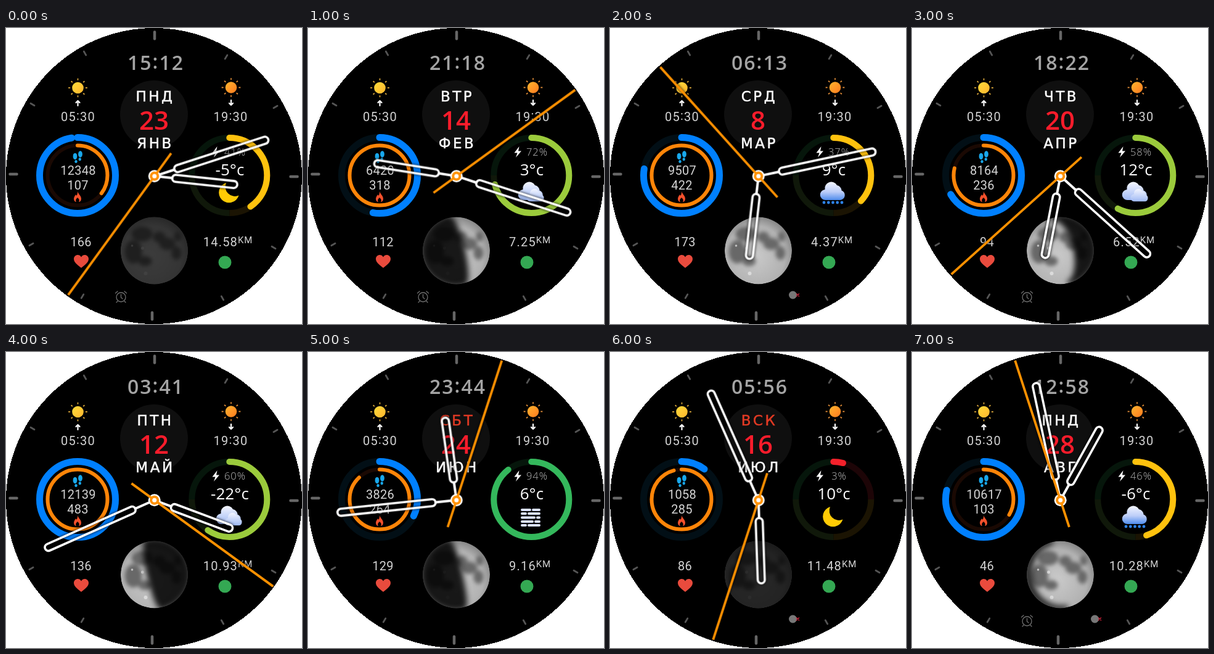
Recreate the animation shown at these times as an HTML page. Size 480 px wide and 480 px high, loop 8000 ms.

```html
<!DOCTYPE html>
<html lang="ru">
<head>
<meta charset="utf-8">
<title>Watch face</title>
<style>
  html, body { margin: 0; width: 100%; height: 100%; overflow: hidden; background: #fff; }
  svg { display: block; width: 480px; height: 480px; }
  text { text-anchor: middle; white-space: pre; }
  .face { visibility: hidden; animation: show 8s step-end infinite; }
  @keyframes show { 0% { visibility: visible; } 12.5%, 100% { visibility: hidden; } }
  .time { font: 600 32px "Open Sans", sans-serif; letter-spacing: 2px; fill: #a4a4a4; }
  .num { font: 400 20px Roboto, sans-serif; letter-spacing: .3px; fill: #d4d4d4; }
  .wide { letter-spacing: 1.2px; }
  .word { font: 23px "DejaVu Sans", sans-serif; letter-spacing: 3.5px; fill: #fff; stroke: #fff; stroke-width: .5px; }
  .off { fill: #e23a24; stroke: #e23a24; }
  .date { font: 600 42px "Open Sans", sans-serif; fill: #f91c2b; }
  .bat { font: 300 16.5px "Open Sans", sans-serif; letter-spacing: 1px; fill: #bdbdbd; }
  .temp { font: 400 26px "Open Sans", sans-serif; letter-spacing: .1px; fill: #fff; }
  .unit { font-size: 15px; letter-spacing: .8px; }
  .line { fill: none; stroke-linecap: round; stroke-linejoin: round; }
  .hands { filter: drop-shadow(0 0 2px #000); }
</style>
</head>
<body>
<svg id="watch" viewBox="0 0 480 480">
  <defs>
    <radialGradient id="moonFill" cx=".45" cy=".58" r=".6">
      <stop offset="0" stop-color="#cacaca"/><stop offset=".75" stop-color="#b2b2b2"/><stop offset="1" stop-color="#848484"/>
    </radialGradient>
    <linearGradient id="cloudFill" x1="0" y1="0" x2="0" y2="1">
      <stop offset="0" stop-color="#f2f5ff"/><stop offset=".55" stop-color="#bccdf8"/><stop offset="1" stop-color="#4f8cec"/>
    </linearGradient>
    <linearGradient id="paleFill" x1="0" y1="0" x2="0" y2="1">
      <stop offset="0" stop-color="#f4f6ff"/><stop offset="1" stop-color="#9fb9f4"/>
    </linearGradient>
    <linearGradient id="sunFill" x1="0" y1="0" x2="1" y2="1">
      <stop offset="0" stop-color="#ffdc3a"/><stop offset="1" stop-color="#ffb52e"/>
    </linearGradient>
    <linearGradient id="duskFill" x1="0" y1="0" x2="1" y2="1">
      <stop offset="0" stop-color="#ffb52e"/><stop offset="1" stop-color="#ff7a1f"/>
    </linearGradient>
    <filter id="soft" x="-30%" y="-30%" width="160%" height="160%"><feGaussianBlur stdDeviation="3"/></filter>
    <filter id="dusk" x="-50%" y="-50%" width="200%" height="200%"><feGaussianBlur stdDeviation="5"/></filter>
    <clipPath id="disc"><circle r="54.5"/></clipPath>
    <g id="moon" clip-path="url(#disc)">
      <circle r="54.5" fill="url(#moonFill)"/>
      <g filter="url(#soft)" fill="#686868">
        <ellipse cx="-20" cy="-27" rx="17" ry="12"/><ellipse cx="-34" cy="2" rx="14" ry="19"/>
        <ellipse cx="8" cy="-22" rx="10" ry="9"/><ellipse cx="21" cy="-11" rx="13" ry="10"/>
        <ellipse cx="38" cy="-23" rx="6" ry="8"/><ellipse cx="36" cy="4" rx="8" ry="11"/>
        <ellipse cx="-15" cy="17" rx="11" ry="8"/>
      </g>
      <g fill="#e8e8e8" opacity=".7"><circle cx="-14" cy="37" r="3"/><circle cx="-19" cy="-4" r="2.5"/><circle cx="-36" cy="-8" r="1.8"/></g>
    </g>
    <path id="cloud" d="M350 279a8.500 8.500 0 0 1-1.500-17 10.500 10.500 0 0 1 19.500-7 9 9 0 0 1 7.500 8.500 8 8 0 0 1-2 15.500Z"/>
  </defs>
</svg>
<script>
const svg = document.getElementById('watch');

const text = (cls, x, y, s) => `<text class="${cls}" x="${x}" y="${y}">${s}</text>`;
const clock = (cls, x, y, s) => text(cls, x, y, s.replace(/:(.*)/, '<tspan dy="-2">:</tspan><tspan dy="2">$1</tspan>'));
const stroke = (d, color, w) => `<path class="line" d="${d}" stroke="${color}" stroke-width="${w}"/>`;
const ring = (x, r, w, color, from, sweep, cap = 'round') =>
  `<circle cx="${x}" cy="239" r="${r}" fill="none" stroke="${color}" stroke-width="${w}" pathLength="360"
    stroke-dasharray="${sweep} 360" stroke-linecap="${cap}" transform="rotate(${from - 90} ${x} 239)"/>`;

function sun(x, y, color, fill) {
  return `<g transform="translate(${x} ${y})"><circle r="9.300" fill="url(#${fill})"/>
    <circle r="13.800" fill="none" stroke="${color}" stroke-width="3" pathLength="80" stroke-dasharray="1.600 8.400" stroke-dashoffset=".8"/></g>`;
}

function ticks() {
  const big = [[241, 12], [467, 241], [237, 467], [12, 237]];
  const small = [[128, 41], [357, 47], [437, 128], [434, 356], [351, 438], [124, 435], [41, 351], [43, 124]];
  const draw = (len, w, color) => ([x, y], i) => {
    const a = len > 5 ? i * 90 : Math.atan2(y - 240, x - 240) * 180 / Math.PI + 90;
    return `<path class="line" d="M0 ${-len}V${len}" stroke="${color}" stroke-width="${w}" transform="translate(${x} ${y}) rotate(${a})"/>`;
  };
  return big.map(draw(5.5, 4.5, '#666')).join('') + small.map(draw(3.5, 2.8, '#555')).join('');
}

const feet = `<g fill="#18a8ec">
  <ellipse cx="120.500" cy="204.500" rx="3.400" ry="5.300"/><ellipse cx="119.800" cy="212.800" rx="2.200" ry="2.600"/>
  <ellipse cx="112" cy="208" rx="3.400" ry="5.300"/><ellipse cx="113.500" cy="216.500" rx="2.200" ry="2.600"/></g>`;
const flame = `<path fill="#f4512c" d="M116 265c1 4 6 7 6 12 0 3-2 5-4 5 2-3 0-5-2-7-2 2-4 4-2 7-2 0-4-2-4-5 0-3 2-5 3-7l1 2c2-2 2-4 2-7Z"/>`;
const heart = `<path fill="#e94b3d" d="M122 389C116 384 110 380 110 374.500c0-7 9-9 12-3 3-6 12-4 12 3 0 5.500-6 9.500-12 14.500Z"/>`;
const bolt = `<path fill="#fff" d="M342.500 192 334.500 202.500H339.500L337 210 346 199.500H341Z"/>`;
const alarm = `<circle cx="186.500" cy="436.500" r="7.500" fill="none" stroke="#707070" stroke-width="1.300"/>` +
  stroke('M186.500 432V437L189 439M177.500 430 181 427M195.500 430 192 427M181 443 179 445M192 443 194 445', '#707070', 1.3);
const link = `<circle cx="296.500" cy="433" r="6.500" fill="#777"/>` + stroke('M302.500 431 306.500 435M306.500 431 302.500 435', '#d6203a', 1.3);

const weather = {
  night: `<path fill="#ffcb05" d="M357 251a16.500 16.500 0 1 0 20.500 20.500A15.500 15.500 0 0 1 357 251Z"/>`,
  cloud: `<use href="#cloud" fill="url(#paleFill)"/>
    <use href="#cloud" fill="url(#paleFill)" transform="translate(116 86) scale(.7)"/>`,
  rain: `<use href="#cloud" fill="url(#cloudFill)"/>` +
    [347, 354.3, 361.5, 368.7, 376].map(x => `<circle cx="${x}" cy="283" r="2.400" fill="#2d82ea"/>`).join(''),
  fog: stroke('M347 256H360M365 256H375M347 262H353M358 262H375M347 268.500H367M372 268.500H375M347 275H364M369 275H375M347 281H353M358 281H375', '#dbe2ff', 4)
};

// edge: where the shadow ends, measured from the disc's middle
function moon([side, edge, dark]) {
  const shade = `M0-54.500A54.500 54.500 0 0 ${side > 0 ? 1 : 0} 0 54.500A${Math.abs(edge)} 54.500 0 0 ${edge < 0 ? 1 : 0} 0-54.500Z`;
  const full = Math.abs(edge) > 54;
  return `<g transform="translate(240.500 361)"><use href="#moon"/><g clip-path="url(#disc)">` +
    (full ? `<circle r="55" opacity="${dark}"/>`
      : `<path d="${shade}" stroke="#000" stroke-width="8" transform="rotate(-13)" filter="url(#dusk)" opacity="${dark}"/>`) +
    `</g></g>`;
}

function hand(angle, start, end) {
  return `<g transform="rotate(${angle})">${stroke(`M0-8V${-start}`, '#fff', 4)}
    <rect x="-5.700" y="${2 - end}" width="11.400" height="${end - start - 2}" rx="5.700" fill="none" stroke="#fff" stroke-width="3.600"/></g>`;
}

function hands(time, sec) {
  const [h, m] = time.split(':').map(Number);
  return `<g class="hands" transform="translate(240.700 240.200)">${hand(h * 30 + m / 2, 29, 137)}${hand(m * 6, 34, 196)}
    <circle r="10" fill="#fff"/>
    <path d="M0 46V-238" stroke="#ff9100" stroke-width="3.800" transform="rotate(${sec * 6})"/>
    <circle r="7.500" fill="#ff9100"/><circle r="3.500" fill="#fff"/></g>`;
}

const YELLOW = '#ffc20e', LIME = '#9bcb3c', GREEN = '#34b85c', RED = '#f4212b';
const faces = [
  { time: '15:12', sec: 36, day: 'ПНД', date: 23, month: 'ЯНВ', steps: 12348, blue: 351, kcal: 107, burn: 127,
    bat: 41, arc: 146, color: YELLOW, temp: '-5', sky: 'night', pulse: 166, km: '14.58', moon: [-1, 55, .7], alarm: 1 },
  { time: '21:18', sec: 9, day: 'ВТР', date: 14, month: 'ФЕВ', steps: 6420, blue: 190, kcal: 318, burn: 360,
    bat: 72, arc: 256, color: LIME, temp: '3', sky: 'cloud', pulse: 112, km: '7.25', moon: [-1, 10, .88], alarm: 1 },
  { time: '06:13', sec: 53, day: 'СРД', date: 8, month: 'МАР', steps: 9507, blue: 280, kcal: 422, burn: 360,
    bat: 37, arc: 133, color: YELLOW, temp: '9', sky: 'rain', pulse: 173, km: '4.37', moon: [-1, 55, 0], link: 1 },
  { time: '18:22', sec: 38, day: 'ЧТВ', date: 20, month: 'АПР', steps: 8164, blue: 240, kcal: 236, burn: 284,
    bat: 58, arc: 208, color: LIME, temp: '12', sky: 'cloud', pulse: 94, km: '6.52', moon: [1, 25, .88], alarm: 1 },
  { time: '03:41', sec: 21, day: 'ПТН', date: 12, month: 'МАЙ', steps: 12139, blue: 360, kcal: 483, burn: 360,
    bat: 60, arc: 215, color: LIME, temp: '-22', sky: 'cloud', pulse: 136, km: '10.93', moon: [1, -8, .88] },
  { time: '23:44', sec: 3, day: 'СБТ', date: 24, month: 'ИЮН', steps: 3826, blue: 116, kcal: 264, burn: 317,
    bat: 94, arc: 322, color: GREEN, temp: '6', sky: 'fog', pulse: 129, km: '9.16', moon: [-1, 6, .88] },
  { time: '05:56', sec: 33, day: 'ВСК', date: 16, month: 'ИЮЛ', steps: 1058, blue: 37, kcal: 285, burn: 345,
    bat: 3, arc: 15, color: RED, temp: '10', sky: 'night', pulse: 86, km: '11.48', moon: [-1, 55, .8], link: 1 },
  { time: '12:58', sec: 57, day: 'ПНД', date: 28, month: 'АВГ', steps: 10617, blue: 284, kcal: 103, burn: 121,
    bat: 46, arc: 163, color: YELLOW, temp: '-6', sky: 'rain', pulse: 46, km: '10.28', moon: [-1, -50, .85], alarm: 1, link: 1 }
];

const dial = `<circle cx="240" cy="240" r="240" shape-rendering="crispEdges"/>${ticks()}
  <circle cx="240" cy="140" r="55" fill="#0f0f0f"/>` +
  sun(116.5, 97, '#e0ab3c', 'sunFill') + sun(365, 96.5, '#e8913a', 'duskFill') +
  stroke('M116.500 126V118M113.500 121 116.500 118 119.500 121M365 117V125M362 122 365 125 368 122', '#fff', 2.2) +
  clock('num wide', 117, 151, '05:30') + clock('num wide', 364.5, 151, '19:30') +
  ring(116, 61.5, 11, '#020f16', 0, 360) + ring(116, 48.5, 6, '#1a0903', 0, 360) +
  ['#1d0507', '#1b1403', '#10180a', '#06160b'].map((c, i) => ring(362.3, 61, 10, c, i * 90, 90, 'butt')).join('') +
  feet + flame + heart + bolt + `<circle cx="355" cy="380" r="10.500" fill="#34a853"/>`;

function face(f, i) {
  const off = i === 5 || i === 6 ? 'word off' : 'word';
  return `<g class="face" style="animation-delay:${i - 8}s">` +
    clock('time', 243, 68, f.time) +
    text(off, 242, 119, f.day) + text('date', 240, 165, f.date) + text('word', 242, 195, f.month) +
    ring(116, 61.5, 11, '#0080ff', 0, f.blue) + ring(116, 48.5, 6, '#ff8508', 0, f.burn) +
    ring(362.3, 61, 10, f.color, 0, f.arc) +
    text('num', 117, 238, f.steps) + text('num', 116.5, 262, f.kcal) + text('num', 121.5, 354, f.pulse) +
    text('num wide', 360, 354, `${f.km}<tspan class="unit" dy="-5">KM</tspan>`) +
    text('bat', 371.5, 207, f.bat + '%') + text('temp', 363, 239, f.temp + '°c') +
    weather[f.sky] + moon(f.moon) + (f.alarm ? alarm : '') + (f.link ? link : '') +
    hands(f.time, f.sec) + `</g>`;
}

svg.insertAdjacentHTML('beforeend', dial + faces.map(face).join(''));
</script>
</body>
</html>
```
